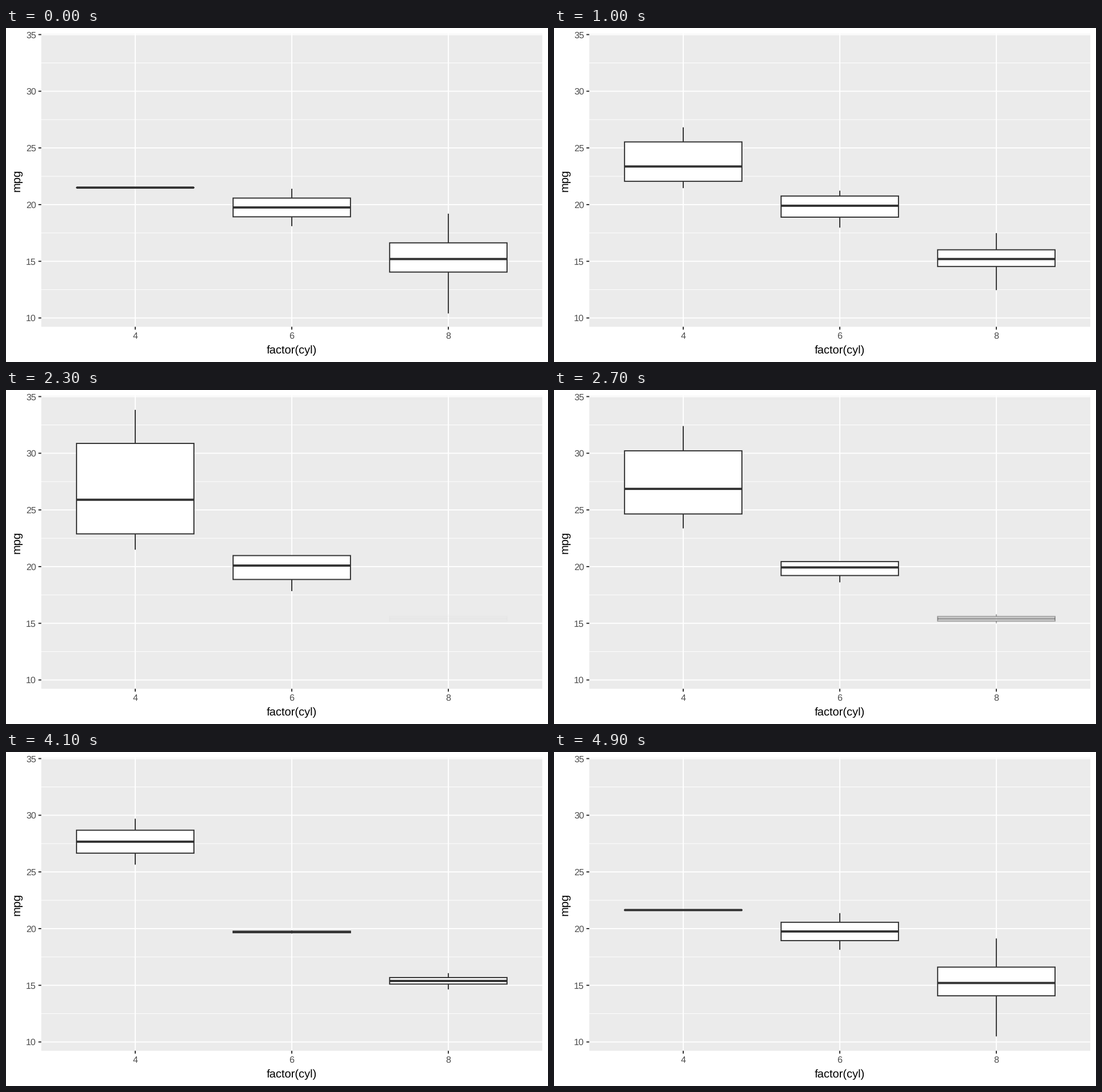
Recreate the animation shown at these times as a matplotlib script. Size 952x588 px, loop 5 s.

```python
import numpy as np
import matplotlib as mpl
import matplotlib.pyplot as plt
from matplotlib.animation import FuncAnimation
from matplotlib.lines import Line2D
from matplotlib.patches import Rectangle

mpl.rcParams["font.family"] = "Liberation Sans"
mpl.rcParams["text.hinting"] = "none"

W, H, DPI = 952, 588, 64
PT = 72 / DPI                       # points per pixel
LEFT, RIGHT, TOP, BOTTOM = 62, 941.92, 10.08, 525.95
LINE, TICK = 1.956, 5.04
DARK, LABEL = "#333333", "#4D4D4D"
LOW, HIGH = 9.225, 35.075           # value range of the panel
UNIT = (RIGHT - LEFT) / 3.2         # width of one category
HALF = 0.375 * UNIT
TWEEN, PERIOD, FRAMES = 11, 17, 50

CYLS = (4, 6, 8)
# mpg by number of cylinders, one dict per number of gears (mtcars)
GEARS = [
    {4: [21.5], 6: [21.4, 18.1],
     8: [18.7, 14.3, 16.4, 17.3, 15.2, 10.4, 10.4, 14.7, 15.5, 15.2, 13.3, 19.2]},
    {4: [22.8, 24.4, 22.8, 32.4, 30.4, 33.9, 27.3, 21.4],
     6: [21.0, 21.0, 19.2, 17.8]},
    {4: [26.0, 30.4], 6: [19.7], 8: [15.8, 15.0]},
]
STATES = [{c: np.quantile(v, [0, 0.25, 0.5, 0.75, 1]) for c, v in g.items()}
          for g in GEARS]

fig = plt.figure(figsize=(W / DPI, H / DPI), dpi=DPI, facecolor="white")
ax = fig.add_axes([0, 0, 1, 1])
ax.set_xlim(0, W)
ax.set_ylim(H, 0)
ax.axis("off")


def ypix(value):
    return BOTTOM - (value - LOW) / (HIGH - LOW) * (BOTTOM - TOP)


def xpix(index):
    return LEFT + (index + 0.6) * UNIT


def line(xs, ys, color, width, z):
    return ax.add_line(Line2D(xs, ys, color=color, lw=width * PT, zorder=z,
                              solid_capstyle="butt", snap=False))


def label(x, y, text, size, color, **kw):
    ax.text(x, y, text, fontsize=size * PT, color=color, va="baseline", **kw)


def draw_panel():
    ax.add_patch(Rectangle((LEFT, TOP), RIGHT - LEFT, BOTTOM - TOP,
                           fc="#EBEBEB", ec="none", snap=False, zorder=0))
    for v in np.arange(12.5, 35, 5):
        line([LEFT, RIGHT], [ypix(v)] * 2, "white", LINE / 2, 1)
    for v in range(10, 36, 5):
        y = ypix(v)
        line([LEFT, RIGHT], [y] * 2, "white", LINE, 2)
        line([LEFT - TICK, LEFT], [y] * 2, DARK, LINE, 2)
        label(LEFT - 9.07, y + 5.8, str(v), 16.13, LABEL, ha="right")
    for i, cyl in enumerate(CYLS):
        x = xpix(i)
        line([x] * 2, [TOP, BOTTOM], "white", LINE, 2)
        line([x] * 2, [BOTTOM, BOTTOM + TICK], DARK, LINE, 2)
        label(x, 547, str(cyl), 16.13, LABEL, ha="center")
    label((LEFT + RIGHT) / 2, 573, "factor(cyl)", 20.17, "black", ha="center")
    label(25, (TOP + BOTTOM) / 2, "mpg", 20.17, "black", ha="center",
          rotation=90, rotation_mode="anchor")


class Box:
    def __init__(self, index):
        x = xpix(index)
        self.whiskers = [line([x] * 2, [0, 0], DARK, LINE, 3) for _ in range(2)]
        self.body = ax.add_patch(Rectangle(
            (x - HALF, 0), 2 * HALF, 1, fc="white", ec=DARK, lw=LINE * PT,
            joinstyle="miter", snap=False, zorder=4))
        self.median = line([x - HALF, x + HALF], [0, 0], DARK, 2 * LINE, 5)
        self.parts = [*self.whiskers, self.body, self.median]

    def show(self, stats, alpha):
        for part in self.parts:
            part.set_visible(stats is not None)
            part.set_alpha(alpha)
        if stats is None:
            return
        low, q1, mid, q3, high = ypix(stats)
        self.whiskers[0].set_ydata([q1, low])
        self.whiskers[1].set_ydata([q3, high])
        self.body.set_y(q3)
        self.body.set_height(max(q1 - q3, 0.02))
        self.median.set_ydata([mid, mid])


def blend(old, new, w):
    """Five-number summary and opacity part of the way between two states."""
    if w >= 1 or (old is None and new is None):
        return new, 1
    if old is None:                 # enter by fading in
        return new, w
    if new is None:                 # exit by shrinking to the median
        new = np.full(5, old[2])
    return old + (new - old) * w, 1


draw_panel()
boxes = {cyl: Box(i) for i, cyl in enumerate(CYLS)}


def update(frame):
    k, step = divmod(frame + PERIOD - 5, PERIOD)
    t = min(step / TWEEN, 1)
    w = (1 - np.cos(np.pi * t)) / 2
    old, new = STATES[(k - 1) % 3], STATES[k % 3]
    for cyl, box in boxes.items():
        box.show(*blend(old.get(cyl), new.get(cyl), w))
    return [part for box in boxes.values() for part in box.parts]


anim = FuncAnimation(fig, update, frames=FRAMES, interval=100, repeat=True,
                     init_func=lambda: update(0))
plt.show()
```
